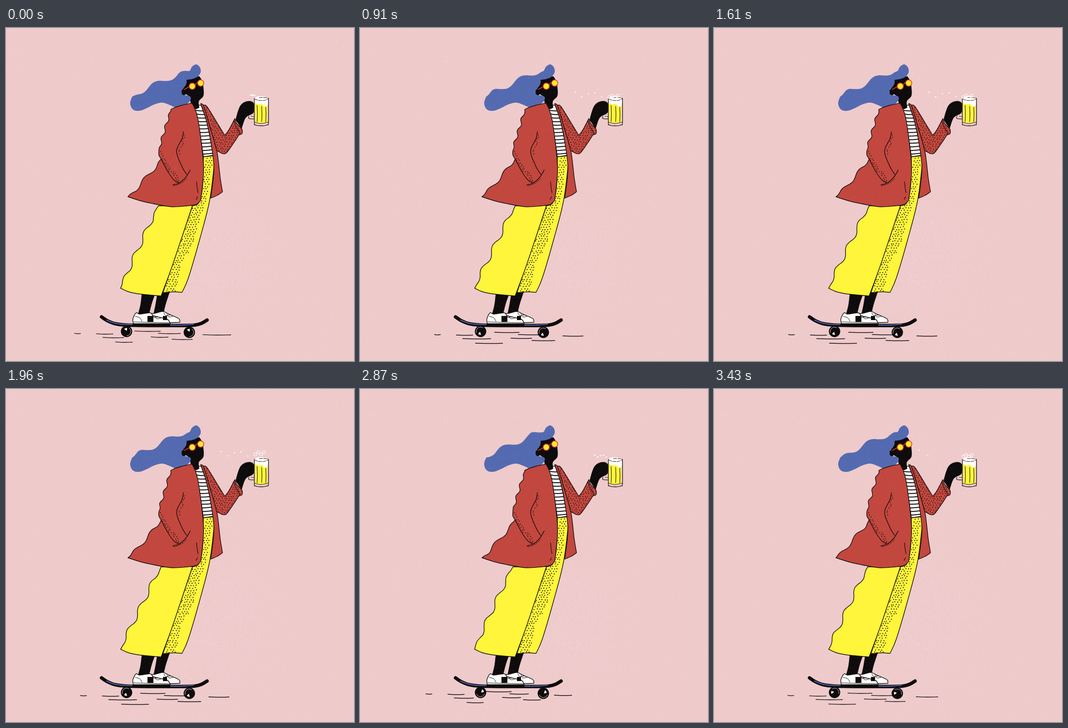
Write an HTML page with a canvas that moves like this. It is 765 by 732 pixels and loops after 3500 ms.

```html
<!DOCTYPE html>
<html lang="en">
<head>
<meta charset="utf-8">
<title>Skater</title>
<style>
html, body { margin: 0; width: 100%; height: 100%; overflow: hidden; background: #eecacb; }
canvas { display: block; }
</style>
</head>
<body>
<canvas id="stage" width="765" height="732"></canvas>
<script>
const W = 765, H = 732, STEP = 70, TAU = Math.PI * 2;
const INK = '#0e0b0c', RED = '#c2473e', YELLOW = '#fff53a', BLUE = '#546ab0', WHITE = '#fffdfb', PINK = '#eecacb';
const ctx = document.getElementById('stage').getContext('2d');

function random(seed) {
  return () => (seed = (seed * 16807) % 2147483647) / 2147483647;
}

const parse = s => s.trim().split(/\s+/).map(p => p.split(',').map(Number));

// Points from a to b, rippled sideways by a wave that fades out at both ends
function ripple(a, b, amp, bias, waves, phase) {
  const dx = b[0] - a[0], dy = b[1] - a[1], len = Math.hypot(dx, dy), n = 22, pts = [];
  for (let i = 0; i <= n; i++) {
    const s = i / n, fade = Math.min(1, 6 * s, 6 * (1 - s));
    const d = fade * (bias + amp * Math.cos(TAU * (waves * s - phase))) / len;
    pts.push(`${a[0] + dx * s + dy * d},${a[1] + dy * s - dx * d}`);
  }
  return pts.join(' ');
}

// Segments parted by "|" are smooth inside and meet at corners.
function curve(text, close) {
  const path = new Path2D();
  text.split('|').forEach((part, n) => {
    const p = parse(part);
    n ? path.lineTo(...p[0]) : path.moveTo(...p[0]);
    for (let i = 0; i < p.length - 1; i++) {
      const a = p[i - 1] || p[i], b = p[i], c = p[i + 1], d = p[i + 2] || c;
      path.bezierCurveTo(b[0] + (c[0] - a[0]) / 6, b[1] + (c[1] - a[1]) / 6,
        c[0] - (d[0] - b[0]) / 6, c[1] - (d[1] - b[1]) / 6, c[0], c[1]);
    }
  });
  if (close) path.closePath();
  return path;
}

function stroke(path, width = 1.4, color = INK) {
  ctx.lineWidth = width;
  ctx.strokeStyle = color;
  ctx.stroke(path);
}

function shape(text, fill, width = 1.4) {
  const path = curve(text, true);
  ctx.fillStyle = fill;
  ctx.fill(path);
  if (width) stroke(path, width);
  return path;
}

const line = (text, width, color) => stroke(curve(text), width, color);

function oval(x, y, rx, ry, fill) {
  ctx.beginPath();
  ctx.ellipse(x, y, rx, ry, 0, 0, TAU);
  ctx.fillStyle = fill;
  ctx.fill();
}

function ring(x, y, r, width, color) {
  const path = new Path2D();
  path.arc(x, y, r, 0, TAU);
  stroke(path, width, color);
}

// Ink dots on a loose staggered grid inside a closed outline
function dots(text, gap, r) {
  const path = curve(text, true), pts = parse(text.replace(/\|/g, ' ')), rnd = random(77);
  const xs = pts.map(p => p[0]), ys = pts.map(p => p[1]);
  const left = Math.min(...xs), right = Math.max(...xs), bottom = Math.max(...ys);
  let odd = 0;
  for (let y = Math.min(...ys); y < bottom; y += gap * .87, odd ^= 1) {
    for (let x = left + odd * gap / 2; x < right; x += gap) {
      const px = x + (rnd() - .5) * 2.4, py = y + (rnd() - .5) * 2.4;
      if (ctx.isPointInPath(path, px, py)) oval(px, py, r, r, INK);
    }
  }
}

function layer(paint) {
  const c = document.createElement('canvas');
  c.width = W;
  c.height = H;
  paint(c.getContext('2d'));
  return c;
}

const paper = layer(g => {
  const rnd = random(5);
  g.fillStyle = PINK;
  g.fillRect(0, 0, W, H);
  g.fillStyle = '#fff3f2';
  const speck = (x, y) => {
    const s = .6 + rnd() * .8;
    g.globalAlpha = .1 + rnd() * .35;
    g.fillRect(x, y, s, s);
  };
  for (let i = 0; i < 9000; i++) speck(rnd() * W, rnd() * H);
  for (let i = 0; i < 5000; i++) {
    const a = rnd() * TAU, d = Math.sqrt(-2 * Math.log(rnd())) * 75;
    speck(450 + Math.cos(a) * d, 505 + Math.sin(a) * d * 1.2);
  }
});

const grain = layer(g => {
  const rnd = random(31);
  g.fillStyle = '#f5cfc9';
  for (let i = 0; i < 5000; i++) {
    g.globalAlpha = .05 + rnd() * .17;
    g.fillRect(200 + rnd() * 390, 75 + rnd() * 590, 1, 1);
  }
});

// Speed lines swing around their places, each with its own changing length.
function road(pose) {
  const swing = Math.cos(TAU * (pose - 3.4) / 5), rnd = random(900 + pose * 37);
  const places = '150,671 198,672 212,680 240,690 282,666 334,671 318,679 364,684 432,674';
  parse(places).forEach(([x, y], i) => {
    const from = x + 5 + 10 * swing, top = y + 1 + 2 * swing;
    const length = i ? 36 + rnd() * 26 : 13;
    line(`${from},${top} ${from + length / 2},${top + .8} ${from + length},${top + .3}`);
  });
}

function wheel(x, y, pose) {
  oval(x, y, 12.5, 12.5, INK);
  ctx.save();
  ctx.translate(x, y);
  ctx.rotate(pose * TAU / 5 - 1.9);
  ctx.fillStyle = WHITE;
  ctx.beginPath();
  ctx.moveTo(1, 1);
  ctx.arc(0, 0, 7.5, -.45, .5);
  ctx.fill();
  const arc = new Path2D();
  arc.arc(0, 0, 9.5, 1, 3.4);
  stroke(arc, .9, PINK);
  ctx.restore();
}

function board(pose) {
  wheel(265, 667, pose);
  wheel(403, 669, pose);
  line('210,635 222,643 240,650 265,653 320,654 385,654 415,653 430,649 442,642', 7.5);
  line('221,642 236,648 252,651 277,652', 2, BLUE);
  line('362,653 388,653 412,651', 2, BLUE);
}

function feet() {
  shape('299,582 296,608 291,628|314,630 320,606 327,586', INK, 1);
  shape('333,584 329,608 325,627|346,627 351,606 360,579', INK, 1);
  shape('313,628 328,627 345,623 358,629 380,639 382,647|316,649', WHITE);
  shape('280,650 279,639 286,626 294,629 317,626 325,633 354,640 361,650', WHITE);
  line('281,646 310,647 361,648', 1);
  line('284,634 294,637 299,645', 1);
  for (const [x, y] of [[321, 630], [327, 633], [347, 626], [354, 629]])
    line(`${x},${y} ${x + 4},${y + 6} ${x + 13},${y + 5}`, 1);
  ctx.fillStyle = INK;
  ctx.fillRect(345, 633, 9, 9);
  ctx.fillRect(311, 633, 13, 13);
}

function skirt(pose) {
  shape('434,283 456,281|456,283 457,305 447,382 426,464 401,549 387,581|387,581 368,580 345,582|410,391 424,384 432,350 434,283', YELLOW);
  dots('437,286 453,287 447,345 440,378 423,429 406,484 386,518 373,580|347,580 377,495 411,393 426,383 434,345', 6, 1.15);
  const top = 338 + 3 * Math.cos(TAU * (pose - 2.8) / 5);
  const edge = ripple([top, 391], [252, 572], 4.8, -1.4, 3.55, .667 + pose / 5);
  shape(edge + '|252,572 270,580 296,585 341,589|341,589 363,530 385,465 410,390', YELLOW);
}

function shirt() {
  const path = shape('408,168 429,170|429,170 440,202 449,243 455,280|434,283 425,220', WHITE);
  ctx.save();
  ctx.clip(path);
  for (let y = 181; y < 282; y += 7.9) line(`405,${y - 2} 425,${y + 1} 440,${y + 1} 460,${y - 1}`, 2);
  ctx.restore();
}

function head(pose) {
  shape('397,112 412,108 425,106|425,106 431,116 434,130 434,149 424,161 425,175|425,175 416,178 407,167 402,150 385,140 389,134', INK, 0);
  const top = ripple([277, 152], [404, 94], 6, 4, 1.95, .83 - pose / 5);
  shape(`370,174 357,168 343,164 326,168 310,176 293,182 279,179 273,166 ${top} 409,85 418,80 426,86 428,97 421,107 410,112 397,114|397,114 396,124 386,137|386,137 389,146 404,150 406,157 399,166 385,173 370,174`, BLUE, 0);
  oval(391, 142, 5, 5.5, INK);
  line('403,129 392,135', 1.8, '#d33a2c');
  line('416,125 419,121 422,121', 1.8, '#d33a2c');
  for (const [x, y] of [[409.5, 128], [428, 121]]) {
    oval(x, y, 6.8, 6.8, '#ffe92f');
    ring(x, y, 6.8, 1.8, '#e2452d');
  }
}

function coat(pose) {
  shape('428,166 436,173 447,213 463,267 471,330 476,360|476,360 464,368 450,374|450,374 457,308 449,243 440,202 428,166', RED);
  const back = ripple([364, 178], [336, 270], 2.6, -1.2, 3.54, .96 - pose / 5);
  const flap = ripple([341, 288], [268, 371], 3.6, 2.2, 1.98, .5 + pose / 5);
  shape(`409,165 386,170 ${back} 336,279 341,288|${flap}|268,371 300,381 338,389 366,393 398,391 418,388 428,379|428,379 432,345 434,300 424,212 417,182 409,165`, RED);
  line('341,288 356,316 369,334 381,341');
  line('390,228 387,243 375,271 387,305 398,323');
  line('367,345 382,340 396,327 405,312');
  ctx.setLineDash([3, 2]);
  line('369,347 385,341 397,331', 1);
  ctx.setLineDash([]);
  line('419,338 420,350 422,362', 1.2);
  line('421,371 418,377', 1.2);
  dots('337,268 343,272 359,302 383,332 380,340 355,312 343,290', 5.4, 1);
  dots('391,230 394,245 382,280 377,272 384,256', 5.4, 1);
}

function arm() {
  shape('505,202 510,184 516,170 525,163 536,161 544,165 545,177 543,187 530,194 524,202 518,220', INK, 1);
  const sleeve = '434,170 442,173 465,210 481,236|481,236 491,222 503,199|503,199 507,210 518,221 519,232 512,235|512,235 505,246 486,273 476,276 463,269|463,269 455,239 434,170';
  shape(sleeve, RED);
  dots(sleeve, 5.8, 1);
  line('501,204 505,217 512,227 513,235', 1.2);
}

function mug() {
  line('534,194 534,199 547,200', 1.2);
  line('539,194 546,195', 1);
  const glass = '546,155 546,207 548,213 561,215 574,213 577,207 577,155';
  shape(glass, PINK, 0);
  shape('547,165 575,165|574,208 561,210 548,208', YELLOW, 0);
  shape('546,157 551,151 560,150 572,152 577,157|575,171 568,173 563,167 555,168 547,165', WHITE, 0);
  for (const x of [552, 562, 571]) line(`${x},${170 + (x - 552) / 5} ${x + .6},190 ${x},206`, 1.1);
  line(glass, 1.3);
  line('547,207 560,210 576,207', 1);
  ctx.setLineDash([7, 2]);
  line('547,156 555,159 568,159 577,155 568,153 555,153', 1);
  ctx.setLineDash([]);
}

// Two puffs per ten steps blow off the foam; bubbles rise higher in the second.
function foam(step) {
  const age = step % 5 + .5, high = step > 4;
  const lift = high ? Math.max(0, 14 - 7 * Math.abs(step - 7.7)) : 0;
  for (let i = 0; i < 4 && age > 2; i++)
    ring(548 + 6.3 * i, 152 - i % 2 * 3 - lift * (.7 + i % 2 * .15), 3.2, 1.1, WHITE);
  for (let i = 0; i < 5; i++) {
    if (age > 4 && i < 3) continue;
    const rise = 1.6 * Math.cos(i * 2.2) - (high ? 1.8 : .6);
    oval(549 - (5 + 4.2 * i) * age, 148 + rise * age, Math.max(1.3, 2.7 - age * .25), 1.1, WHITE);
  }
}

function draw(step) {
  const pose = step % 5;
  ctx.drawImage(paper, 0, 0);
  ctx.lineJoin = ctx.lineCap = 'round';
  road(pose);
  board(pose);
  feet();
  skirt(pose);
  shirt();
  head(pose);
  coat(pose);
  arm();
  mug();
  foam(step);
  ctx.drawImage(grain, 0, 0);
}

let shown = -1;
const start = performance.now();
function tick() {
  const step = Math.floor((performance.now() - start) / STEP) % 10;
  if (step !== shown) draw(shown = step);
  requestAnimationFrame(tick);
}
tick();
</script>
</body>
</html>
```
